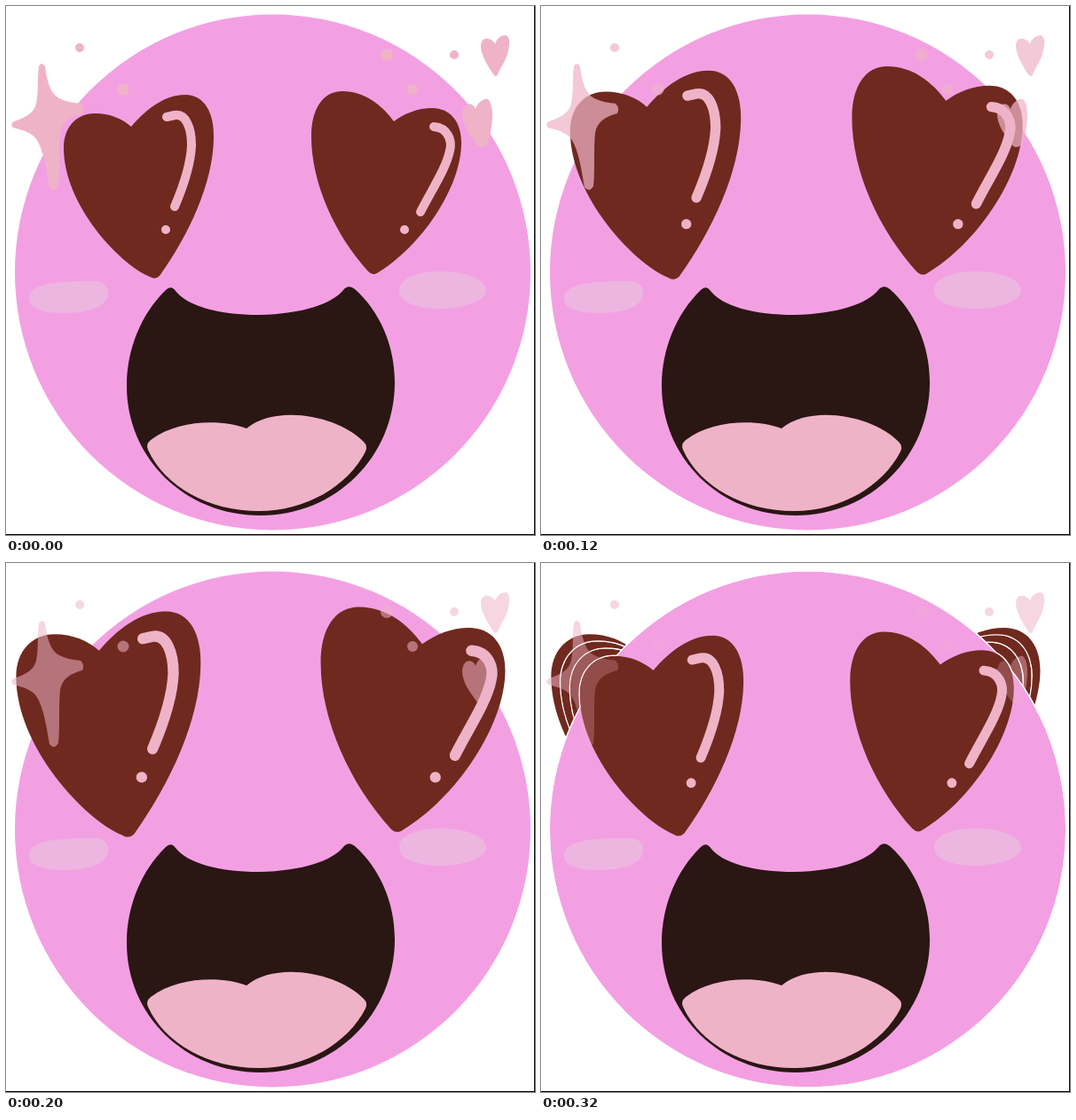
Write an HTML page with a canvas that moves like this. It is 596 by 596 pixels and loops after 360 ms.

```html
<!DOCTYPE html>
<html lang="en">
<head>
<meta charset="utf-8">
<title>Heart eyes</title>
<style>
  html, body { margin: 0; width: 100%; height: 100%; overflow: hidden; background: #fff; }
  canvas { display: block; }
</style>
</head>
<body>
<canvas id="stage" width="596" height="596"></canvas>
<script>
const ctx = document.getElementById('stage').getContext('2d');
const SIZE = 596, CENTER = 298, STEP_MS = 40, STEPS = 9, PEAK = 5;
const PINK = '#efb3c8', BROWN = '#70291e';

const joined = (...parts) => {
  const path = new Path2D();
  parts.forEach(part => path.addPath(part));
  return path;
};
const dot = (x, y, r) => {
  const path = new Path2D();
  path.arc(x, y, r, 0, Math.PI * 2);
  return path;
};

const face = dot(300.5, 300, 290.5);

const cheeks = new Path2D(
  'M26 328C28 312 60 310 100 310C112 310 116 318 115 325C113 342 85 346 65 346C40 346 25 340 26 328Z' +
  'M443 320C444 304 470 299 490 299C518 299 541 308 541 321C540 333 515 341 488 341C462 340 443 334 443 320Z');

const mouth = new Path2D(
  'M180 320Q186 314 191 321C204 338 240 348 285 348C335 347 368 335 380 320Q386 313 393 319' +
  'C421 344 438 382 438 424C438 508 371 574 287 574C201 574 136 509 136 428C136 386 153 346 180 320Z');

const tongue = new Path2D(
  'M271 476C245 466 195 465 163 489Q157 494 160 500C179 542 229 569 285 569' +
  'C338 569 385 541 405 502Q408 496 403 491C375 462 305 448 271 476Z');

const eyes = new Path2D(
  'M162 305C128 291 65 224 65 160C65 136 80 121 100 121C117 121 131 127 141 136' +
  'C158 116 179 100 202 100C224 100 235 121 234 150C233 200 206 258 173 304Q168 309 162 305Z' +
  'M408 299C371 258 344 200 344 147C344 116 357 96 379 96C404 96 424 112 437 130' +
  'C449 121 464 115 480 115C501 115 513 131 513 154C513 205 467 272 418 301Q413 304 408 299Z');

const shine = new Path2D(
  'M181 125L190 123C203 121 209 138 209 157C208 180 199 205 190 226' +
  'M482 136C498 137 503 152 500 163C496 183 479 208 467 232');
const shineDots = joined(dot(180, 252, 5), dot(449, 252, 5));

const sparkles = joined(
  new Path2D(
    'M37 68Q40 62 44 68C46 84 50 99 60 104C68 108 77 109 84 110Q89 115 86 121C74 124 63 130 61 143' +
    'C59 163 61 185 59 203Q54 211 49 204C46 188 44 170 37 155C32 143 20 140 8 137Q4 133 9 130' +
    'C20 126 31 122 34 110C37 96 35 82 37 68Z'),
  new Path2D(
    'M549 77C542 66 535 55 535 45C535 34 547 35 551 43C553 36 558 33 563 33' +
    'C569 35 567 45 566 50C564 61 557 69 554 77Q552 81 549 77Z'),
  new Path2D(
    'M531 157C523 146 514 134 514 122C515 107 526 108 529 116C532 108 538 104 543 105' +
    'C550 112 548 128 547 136C546 145 544 152 541 157Q535 161 531 157Z'),
  dot(83, 47, 5), dot(132, 94, 6.5), dot(429, 55, 7), dot(458, 94, 6), dot(505, 55, 5));

function fill(path, color) {
  ctx.fillStyle = color;
  ctx.fill(path);
}

// The eyes grow from the stage centre up to PEAK, then shrink again.
function eyeMatrix(step) {
  const k = 1 + 0.046 * (PEAK - Math.abs(step - PEAK));
  const shift = CENTER * (1 - k);
  return new DOMMatrix([k, 0, 0, k, shift, shift]);
}

function drawScene(step) {
  fill(face, '#f3a0e3');
  fill(cheeks, '#edb6e1');
  fill(mouth, '#2a1613');
  fill(tongue, PINK);

  ctx.save();
  ctx.setTransform(eyeMatrix(step));
  fill(eyes, BROWN);
  ctx.strokeStyle = PINK;
  ctx.lineWidth = 10;
  ctx.lineCap = ctx.lineJoin = 'round';
  ctx.stroke(shine);
  fill(shineDots, PINK);
  ctx.restore();

  ctx.globalAlpha = 1 - 0.092 * step;
  fill(sparkles, PINK);
  ctx.globalAlpha = 1;
}

// While shrinking, only the face and eyes repaint: the rest keeps a trail.
function drawOverTrail(step) {
  const solid = joined(face);
  solid.addPath(eyes, eyeMatrix(step));
  ctx.save();
  ctx.strokeStyle = '#fff';
  ctx.lineWidth = 2.4;
  ctx.stroke(solid);
  ctx.clip(solid);
  drawScene(step);
  ctx.restore();
}

function draw(step) {
  ctx.fillStyle = '#fff';
  ctx.fillRect(0, 0, SIZE, SIZE);
  drawScene(Math.min(step, PEAK));
  for (let s = PEAK + 1; s <= step; s++) drawOverTrail(s);
  ctx.fillStyle = '#000';
  ctx.fillRect(SIZE - 1, 0, 1, SIZE);
  ctx.fillRect(0, SIZE - 1, SIZE, 1);
}

const start = performance.now();
function tick() {
  draw(Math.floor((performance.now() - start) / STEP_MS) % STEPS);
  requestAnimationFrame(tick);
}
tick();
</script>
</body>
</html>
```
